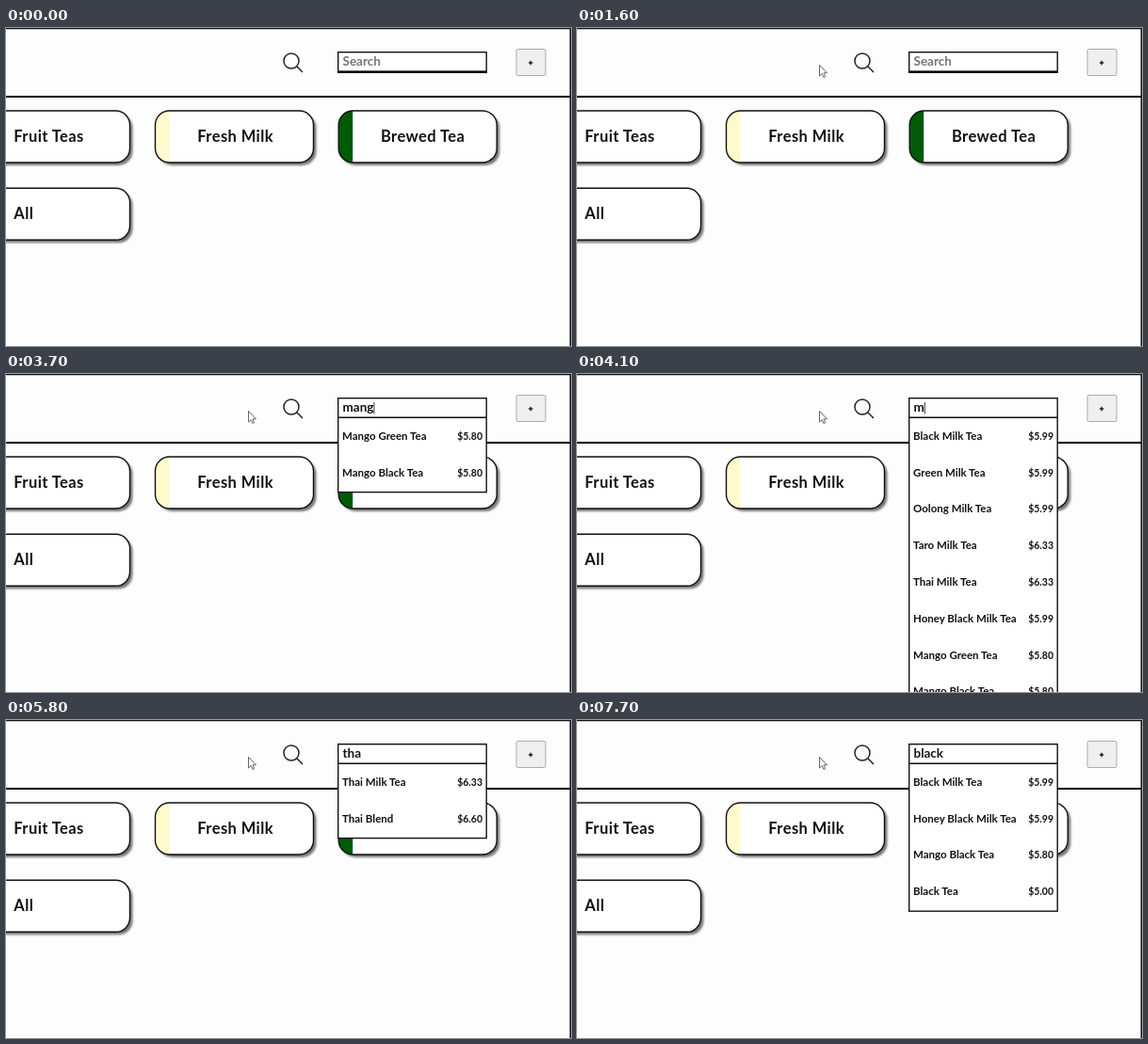
Animation of 600 by 338 pixels, one loop 8 s. Source, as an HTML page:

```html
<!DOCTYPE html>
<html lang="en">
<head>
<meta charset="utf-8">
<title>Tea menu search</title>
<style>
  html, body { margin: 0; width: 100%; height: 100%; overflow: hidden; background: #fdfdfd; }
  svg { display: block; width: 600px; height: 338px; }
  text { font-family: Lato, "Open Sans", sans-serif; font-weight: 700; fill: #111; white-space: pre; }
  .label { font-size: 16.5px; letter-spacing: .4px; }
  .field { font-size: 13.5px; }
  .item { font-size: 11.5px; }
  .price { font-size: 10.5px; text-anchor: end; }
  .card { filter: drop-shadow(3px 3px 1.2px #0008); }
</style>
</head>
<body>
<svg viewBox="0 0 600 338">
  <defs><clipPath id="round"><rect width="168" height="55" rx="15"/></clipPath></defs>
  <path d="M0 .5H599.3V338" fill="none" stroke="#111" stroke-width="1.4"/>
  <path d="M0 73H599" stroke="#000" stroke-width="2.2"/>
  <g fill="none" stroke="#222" stroke-width="1.5">
    <circle cx="303" cy="35" r="8"/><path d="M308.8 40.8L315 47"/>
  </g>
  <rect x="542" y="22.5" width="31" height="28" rx="1.5" fill="#efefef" stroke="#aaa"/>
  <path d="M555 37h4.4M557.2 34.8v4.4" stroke="#222" stroke-width="1.4"/>
  <g id="cards"></g>
  <rect x="352.7" y="25.7" width="157.5" height="20.8" fill="#fff" stroke="#111" stroke-width="1.4"/>
  <path id="underline" d="M352 46.7H511" stroke="#000" stroke-width="2.4"/>
  <text id="field" class="field" x="357.5" y="40"></text>
  <path id="caret" d="M0 30V42.5" stroke="#333" stroke-width="1"/>
  <g id="list"></g>
  <path id="pointer" d="M0 0V11.5L2.7 9L4.4 13L6.2 12.2L4.5 8.3H8Z" fill="#fff" stroke="#555" stroke-width=".9"/>
</svg>
<script>
const LOOP = 8000, STEP = 100, ROW = 38.8;
const $ = id => document.getElementById(id);

const cards = [
  ["Fruit Teas", -36.5, 88, "#fff"], ["Fresh Milk", 158.5, 88, "#fffacd"],
  ["Brewed Tea", 353.2, 88, "#005a08"], ["All", -36.5, 170.3, "#fff"]
];
$("cards").innerHTML = cards.map(([name, x, y, color]) => `
  <g transform="translate(${x} ${y})">
    <rect class="card" width="168" height="55" rx="15" fill="#fff"/>
    <rect width="15" height="55" fill="${color}" clip-path="url(#round)"/>
    <rect width="168" height="55" rx="15" fill="none" stroke="#111" stroke-width="1.4"/>
    <text class="label" x="44.8" y="33">${name}</text>
  </g>`).join("");

const menu = [
  ["Black Milk Tea", 5.99], ["Green Milk Tea", 5.99], ["Oolong Milk Tea", 5.99],
  ["Taro Milk Tea", 6.33], ["Thai Milk Tea", 6.33], ["Honey Black Milk Tea", 5.99],
  ["Taro Blend", 6.6], ["Thai Blend", 6.6], ["Coffee Blend", 6.6],
  ["Mango Green Tea", 5.8], ["Mango Black Tea", 5.8], ["Black Tea", 5]
];

// [time, typed text, caret visible]
const keys = [
  [0, "", 0], [1300, "", 1], [1600, "", 0],
  [2100, "m", 1], [2400, "ma", 1], [2500, "man", 1], [2600, "mang", 1],
  [3100, "mango", 0], [3200, "mango", 1],
  [3700, "mang", 1], [3800, "man", 1], [3900, "ma", 1], [4000, "m", 1], [4200, "", 1],
  [4700, "t", 1], [4800, "th", 1], [4900, "tha", 1], [5000, "thai", 1], [5600, "thai", 0],
  [5800, "tha", 0], [6000, "th", 1], [6100, "t", 1], [6300, "", 1],
  [6600, "b", 1], [6700, "bl", 1], [6800, "bla", 1], [7000, "blac", 1], [7200, "black", 1],
  [7700, "black", 0]
];

// [time, x, y] of the pointer tip
const path = [
  [100, 556, 31], [300, 420, 100], [600, 130, 198], [900, 10, 187],
  [1100, 250, 110], [1300, 552, 30], [1400, 400, 34], [1600, 257.5, 39.5]
];

function pointerAt(t) {
  const i = path.findIndex(p => p[0] > t);
  if (i < 0) return path.at(-1).slice(1);
  const [t0, x0, y0] = path[i - 1], [t1, x1, y1] = path[i];
  const k = (t - t0) / (t1 - t0);
  return [x0 + (x1 - x0) * k, y0 + (y1 - y0) * k];
}

function listFor(query) {
  if (!query) return "";
  const found = menu.filter(([name]) => name.toLowerCase().includes(query));
  const rows = found.map(([name, price], i) => `
    <text class="item" x="357" y="${69.7 + i * ROW}">${name}</text>
    <text class="price" x="506" y="${69.7 + i * ROW}">$${price.toFixed(2)}</text>`);
  return `<rect x="352.7" y="46.3" width="157.5" height="${1.7 + found.length * ROW}"
    fill="#fff" stroke="#111" stroke-width="1.4"/>` + rows.join("");
}

let shown = null;
function draw(now) {
  const t = Math.floor(now % LOOP / STEP) * STEP;
  const [, query, caret] = keys.findLast(k => k[0] <= t);
  const field = $("field");
  if (query !== shown) {
    shown = query;
    field.textContent = query || "Search";
    field.style.fill = query ? "#111" : "#757575";
    $("list").innerHTML = listFor(query);
    $("underline").style.display = query ? "none" : "";
  }
  const end = query ? field.getComputedTextLength() : 0;
  $("caret").setAttribute("transform", `translate(${358 + end} 0)`);
  $("caret").style.display = caret ? "" : "none";

  $("pointer").style.display = t < path[0][0] ? "none" : "";
  if (t >= path[0][0]) $("pointer").setAttribute("transform", `translate(${pointerAt(t)})`);
}

const start = performance.now();
function tick() {
  draw(performance.now() - start);
  requestAnimationFrame(tick);
}
tick();
</script>
</body>
</html>
```
